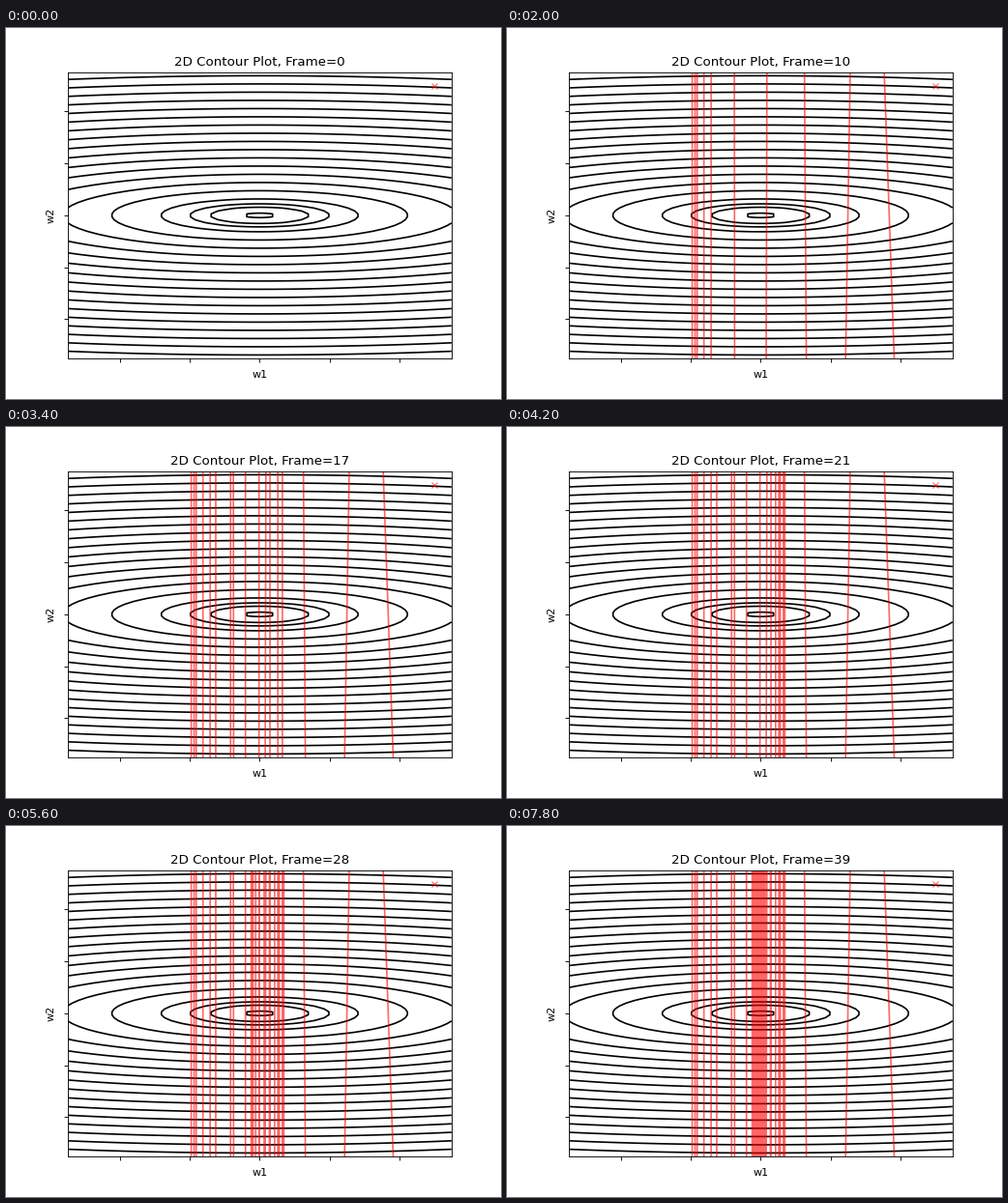
These frames come from a looping animation (512x384 px, 8 s). A matplotlib script:

```python
import numpy as np
import matplotlib.pyplot as plt
from matplotlib.animation import FuncAnimation

FRAMES = 40
INTERVAL = 200
LIMIT = 5.5
RATE = 0.5
MOMENTUM = 0.9
START = np.array([5.0, 5.0])
COEF = np.array([0.1, 2.0])


def loss(w1, w2):
    return COEF[0] * w1 ** 2 + COEF[1] * w2 ** 2


def nesterov_path(steps):
    """Look-ahead points of gradient descent with Nesterov momentum."""
    w, v = START.copy(), np.zeros(2)
    points = []
    for _ in range(steps):
        ahead = w + MOMENTUM * v
        points.append(ahead)
        v = MOMENTUM * v - RATE * 2 * COEF * ahead
        w = w + v
    return np.array(points)


path = nesterov_path(FRAMES + 1)

fig, ax = plt.subplots(figsize=(6.4, 4.8), dpi=80)

# Evenly spaced ellipses, with a few extra levels near the minimum
grid = np.linspace(-LIMIT, LIMIT, 100)
w1, w2 = np.meshgrid(grid, grid)
levels = [0.02, 0.2, 0.4, 0.8] + [0.2 * k ** 2 for k in range(3, 18)]
ax.contour(w1, w2, loss(w1, w2), levels=levels, colors="black", linewidths=1.5)

ax.plot(*START, "x", color="red", alpha=0.6)
trail, = ax.plot([], [], color="red", alpha=0.6, lw=1.5)

ax.set_xlim(-LIMIT, LIMIT)
ax.set_ylim(-LIMIT, LIMIT)
ticks = [-4, -2, 0, 2, 4]
ax.set_xticks(ticks)
ax.set_yticks(ticks)
ax.set_xticklabels([])
ax.set_yticklabels([])
ax.set_xlabel("w1")
ax.set_ylabel("w2")
title = ax.set_title("2D Contour Plot, Frame=0")


def draw(i):
    trail.set_data(*path[1:i + 2].T)
    title.set_text(f"2D Contour Plot, Frame={i}")
    return trail, title


def init():
    return draw(0)


anim = FuncAnimation(fig, draw, frames=FRAMES, init_func=init,
                     interval=INTERVAL, repeat=True)
plt.show()
```
